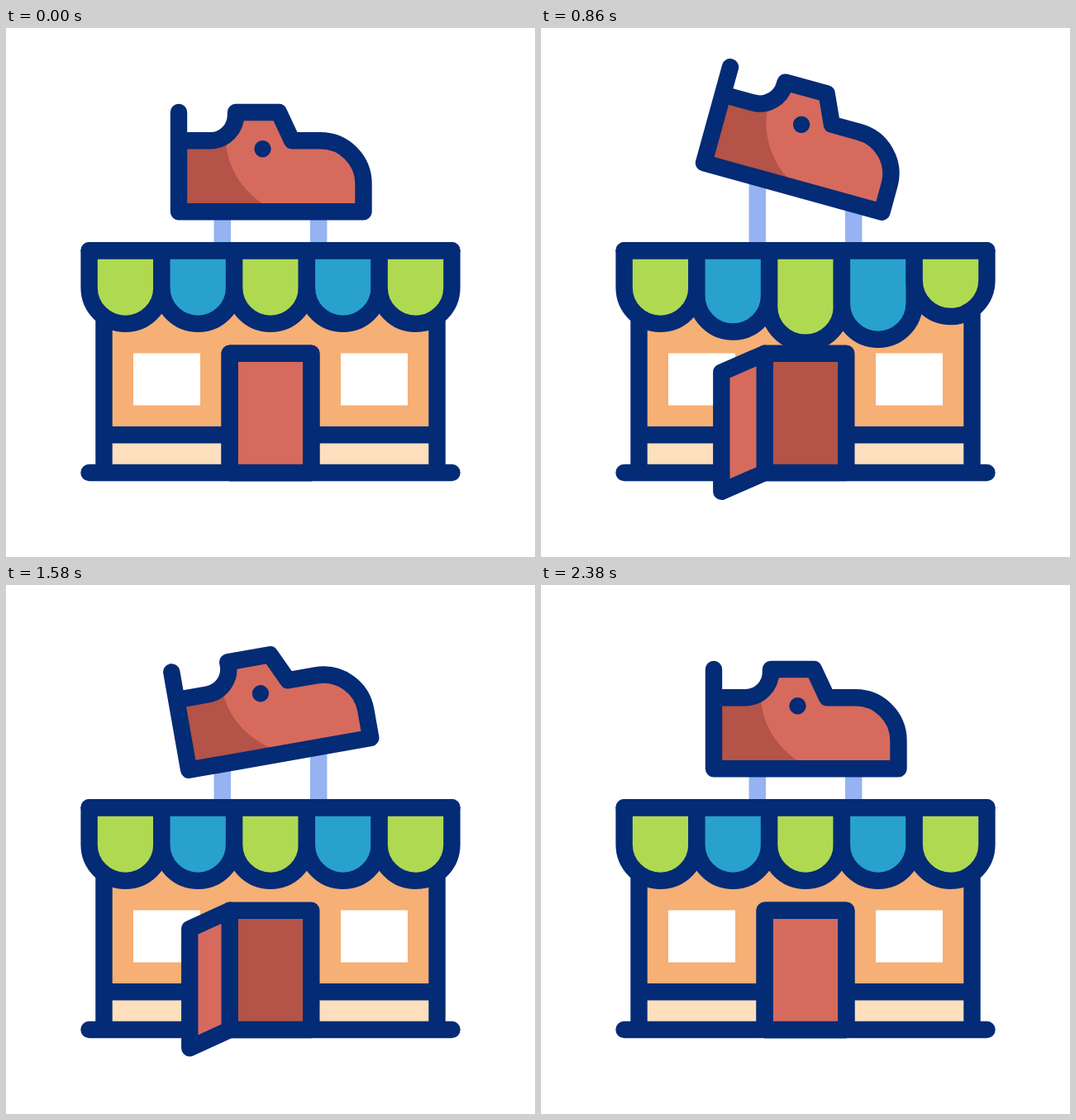
Recreate the animation shown at these times as an HTML page. Size 640 by 640 pixels, loop 2400 ms.

```html
<!DOCTYPE html>
<html lang="en">
<head>
<meta charset="utf-8">
<title>Shoe shop</title>
<style>
  html, body { margin: 0; height: 100%; overflow: hidden; background: #fff; }
  svg { display: block; width: 100vw; height: 100vh; }
  .line { stroke: #042b75; stroke-width: 20.4; stroke-linecap: round; stroke-linejoin: round; }
  .post { stroke: #96b2f3; stroke-width: 20.5; }
</style>
</head>
<body>
<svg viewBox="0 0 640 640" fill="none">
  <path class="post" id="postL"/>
  <path class="post" id="postR"/>

  <path fill="#f6af75" d="M118 269H522V492H118Z"/>
  <path fill="#fddfbe" d="M118 492H522V538H118Z"/>
  <path fill="#fff" d="M154 393.6H235V456.6H154ZM405 393.6H486V456.6H405Z"/>
  <path class="line" d="M118.5 280V538M521.5 280V538M118.5 492.3H521.5M100.5 538H539.5"/>
  <g id="awning"></g>
  <path class="line" d="M100.6 269.2H539.4"/>

  <path class="line" fill="#b45347" d="M270.7 538V393.8H369.3V538Z"/>
  <path class="line" fill="#d66b5d" id="door"/>

  <g id="shoe">
    <path fill="#d66b5d" d="M209 222H432.5V188A52 52 0 0 0 380.5 136.3H346L330 102H278V105A31 31 0 0 1 247 136.3H209Z"/>
    <path fill="#b45347" d="M209 222V136.3H247L266 134C266 165 284 196 313 214V222Z"/>
    <path class="line" d="M209 102V222.3H432.5V188A52 52 0 0 0 380.5 136.3H346L330 102H278V105A31 31 0 0 1 247 136.3H209"/>
    <circle cx="310.5" cy="146.2" r="10.2" fill="#042b75"/>
  </g>
</svg>
<script>
const LOOP = 2400, PITCH = 87.76, LAG = 110;
const byId = id => document.getElementById(id);
const smooth = p => p * p * (3 - 2 * p);

// Keys are [time, value] pairs, eased between neighbours.
function track(keys, t) {
  if (t <= keys[0][0]) return keys[0][1];
  for (let i = 1; i < keys.length; i++) {
    const [t0, v0] = keys[i - 1], [t1, v1] = keys[i];
    if (t < t1) return v0 + (v1 - v0) * smooth((t - t0) / (t1 - t0));
  }
  return keys[keys.length - 1][1];
}

// cubic-bezier(.8, 0, .2, 1)
function sharpEase(p) {
  let lo = 0, hi = 1;
  for (let i = 0; i < 24; i++) {
    const s = (lo + hi) / 2, r = 1 - s;
    if (2.4 * r * r * s + 0.6 * r * s * s + s * s * s < p) lo = s; else hi = s;
  }
  return smooth(lo);
}

const flapKeys = [[0, 0], [292, -31], [592, 25], [868, 0]];
const liftKeys = [0, 24.2, -57, 24, -43, 23, 0].map((y, i) => [i * 357, y]);
const tiltKeys = [[0, 0], [357, -15.9], [1071, 23.7], [1470, -13.6], [1980, 16], [2150, 0]];

const flaps = Array.from({ length: 5 }, (_, i) => {
  const flap = document.createElementNS("http://www.w3.org/2000/svg", "path");
  flap.setAttribute("class", "line");
  flap.setAttribute("fill", i % 2 ? "#28a1cd" : "#b0d952");
  return byId("awning").appendChild(flap);
});

function draw(t) {
  flaps.forEach((flap, i) => {
    const x = 100.6 + i * PITCH, y = 314 + track(flapKeys, t - i * LAG), r = PITCH / 2;
    flap.setAttribute("d", `M${x} 269.2V${y}A${r} ${r} 0 0 0 ${x + PITCH} ${y}V269.2Z`);
  });

  const lift = track(liftKeys, t), tilt = track(tiltKeys, t);
  byId("shoe").setAttribute("transform", `translate(0 ${lift}) rotate(${tilt} 321 162)`);
  const slope = Math.tan(tilt * Math.PI / 180);
  for (const [id, x] of [["postL", 261.8], ["postR", 378.2]]) {
    byId(id).setAttribute("d", `M${x} 269V${Math.min(269, 215 + lift + (x - 321) * slope)}`);
  }

  const half = LOOP / 2;
  const open = t < half ? sharpEase(t / half) : 1 - sharpEase((t - half) / half);
  const x = 369.3 - 161.5 * open, drop = 24.5 * open;
  byId("door").setAttribute("d", `M270.7 393.8L${x} ${393.8 + drop}V${538 + drop}L270.7 538Z`);
}

function frame() {
  draw(performance.now() % LOOP);
  requestAnimationFrame(frame);
}
frame();
</script>
</body>
</html>
```
